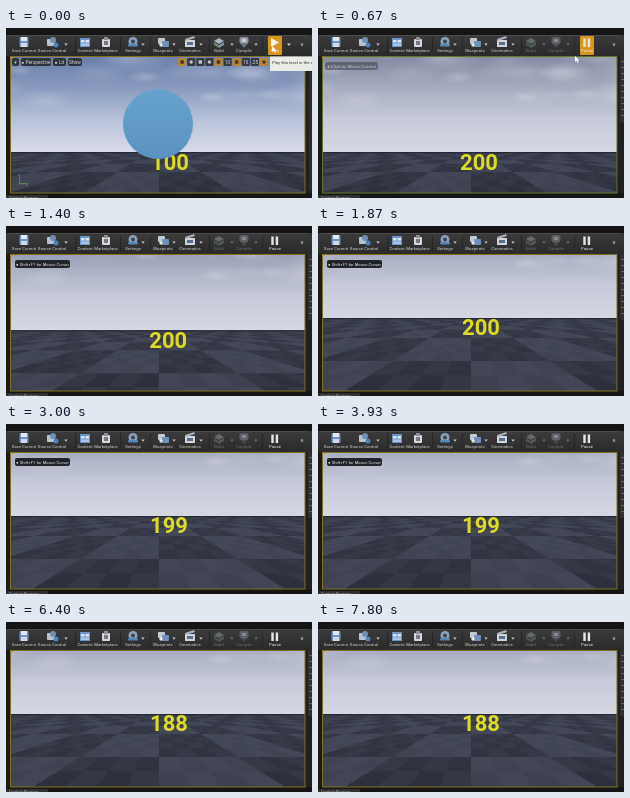
An HTML page with a canvas for the animation above (7.87 s loop, 306 px wide and 170 px high).

```html
<!DOCTYPE html>
<html>
<head>
<meta charset="utf-8">
<style>
html, body { margin: 0; width: 100%; height: 100%; overflow: hidden; background: #191919; }
canvas { display: block; width: 306px; height: 170px; }
</style>
</head>
<body>
<canvas id="stage"></canvas>
<script>
const W = 306, H = 170, LOOP = 7870, PLAY = 340;
const cv = document.getElementById('stage'), c = cv.getContext('2d');
const dpr = window.devicePixelRatio || 1;
cv.width = W * dpr;
cv.height = H * dpr;
c.scale(dpr, dpr);

const clamp = v => Math.max(0, Math.min(1, v));
const smooth = v => { v = clamp(v); return v * v * (3 - 2 * v); };

let seed = 7;
const rnd = () => (seed = seed * 16807 % 2147483647) / 2147483647;
const clouds = Array.from({ length: 34 }, () => ({
  x: rnd() * 370 - 30, y: rnd() * 62 - 112, r: 14 + rnd() * 25, a: .1 + rnd() * .2
}));

function rect(x, y, w, h, color, r = 0) {
  c.fillStyle = color;
  c.beginPath();
  c.roundRect(x, y, w, h, r);
  c.fill();
}
function poly(color, ...p) {
  c.fillStyle = color;
  c.beginPath();
  for (let i = 0; i < p.length; i += 2) c.lineTo(p[i], p[i + 1]);
  c.fill();
}
function disc(x, y, r, color) {
  c.fillStyle = color;
  c.beginPath();
  c.arc(x, y, r, 0, 7);
  c.fill();
}
function text(s, x, y, size, color, align = 'left', weight = 400) {
  c.font = `${weight} ${size}px Roboto, sans-serif`;
  c.textAlign = align;
  c.fillStyle = color;
  c.fillText(s, x, y);
}
function gradient(y0, y1, ...colors) {
  const g = c.createLinearGradient(0, y0, 0, y1);
  colors.forEach((k, i) => g.addColorStop(i / (colors.length - 1), k));
  return g;
}

function sky(h, t, live) {
  const tones = live ? ['#7f879e', '#a5abbf', '#c6cad9', '#d5d7e2'] : ['#677da8', '#8799bd', '#b8c2d9', '#d9dcea'];
  rect(5, 28, 294, h - 28, gradient(h - 98, h, ...tones));
  for (const k of clouds) {
    c.save();
    c.translate(k.x + t * .0012, h + k.y);
    c.scale(1, .38);
    const g = c.createRadialGradient(0, 0, 0, 0, 0, k.r);
    g.addColorStop(0, `rgba(226,226,237,${k.a})`);
    g.addColorStop(1, 'rgba(226,226,237,0)');
    c.fillStyle = g;
    c.fillRect(-k.r, -k.r, 2 * k.r, 2 * k.r);
    c.restore();
  }
}

function floor(h) {
  const vy = h - 6, depth = v => 1 / Math.max(.004, .0204 + .018 * v);
  const tile = (i, j, s, color) => {
    const a = depth(j), b = depth(j + s), k = 1.6;
    poly(color, 153 + i * k * a, vy + a, 153 + (i + s) * k * a, vy + a,
      153 + (i + s) * k * b, vy + b, 153 + i * k * b, vy + b);
  };
  c.save();
  c.beginPath();
  c.rect(5, h, 294, 165 - h);
  c.clip();
  rect(5, h, 294, 165 - h, gradient(h, 165, '#353947', '#2d303c'));
  for (let j = -1; j < 8; j++)
    for (let i = -16; i < 16; i++) {
      if ((i + j) & 1) tile(i, j, 1, 'rgba(88,93,110,.38)');
      if (j < 3 && Math.abs(i + .5) < 7)
        for (let n = 0; n < 16; n++) {
          const u = n & 3, v = n >> 2;
          if ((u + v) & 1) tile(i + u / 4, j + v / 4, .25, 'rgba(110,116,134,.09)');
        }
    }
  rect(5, h, 294, 1.2, 'rgba(25,28,40,.6)');
  c.restore();
}

const tools = [
  [18, 'Save Current'], [46, 'Source Control', 60], [79, 'Content'], [100, 'Marketplace'],
  [127, 'Settings', 137], [157, 'Blueprints', 168], [184, 'Cinematics', 195],
  [213, 'Build', 226], [238, 'Compile', 250]
];
const icons = [
  x => { rect(x - 4.5, 9, 9, 10, '#6f93c8', 1); rect(x - 3, 9, 6, 4, '#e5e9f0'); rect(x - 3, 15, 6, 4, '#d2d9e6'); },
  x => { rect(x - 5, 11, 8, 7, '#b9c4d3', 1); disc(x + 1, 12, 3, '#718fb5'); disc(x + 4, 17, 2.5, '#4f82bd'); },
  x => { rect(x - 5, 10, 10, 9, '#6995c9'); rect(x - 4, 12, 3.5, 2.5, '#dce6f2'); rect(x + .5, 12, 3.5, 2.5, '#dce6f2'); rect(x - 4, 15.5, 8, 2.5, '#aac4e2'); },
  x => { rect(x - 4, 11, 8, 8, '#d6d8db', 1); rect(x - 2, 9, 4, 3, '#8a9097'); rect(x - 2, 13, 4, 4, '#778'); },
  x => { disc(x, 13.5, 4.5, '#8da2bd'); disc(x, 13.5, 2, '#3b4654'); rect(x - 5, 16, 10, 2.5, '#5586b8', 1); },
  x => { rect(x - 5, 10, 7, 6, '#c4cad3', 1); rect(x - 1, 13, 7, 6, '#6d8fb8', 1); disc(x - 2, 17, 1.7, '#e7e7e7'); },
  x => { rect(x - 5, 12, 10, 7, '#d2d5d9'); poly('#aab3bf', x - 5, 11, x + 4, 8, x + 5, 10, x - 4, 13); rect(x - 3, 14, 6, 3, '#56718f'); },
  x => { poly('#a9b3bf', x - 5, 13, x, 10, x + 5, 13, x, 16); poly('#6e8c72', x - 5, 14, x, 17, x, 20, x - 5, 17); poly('#8094a8', x, 17, x + 5, 14, x + 5, 17, x, 20); },
  x => { rect(x - 4.5, 9, 9, 7, '#9099a4', 2); poly('#6c7782', x - 4, 15, x + 4, 15, x, 20); rect(x - 2, 11, 4, 3, '#c8ced4'); }
];

function cursor(x, y) {
  poly('#fff', x, y, x, y + 6, x + 1.5, y + 4.6, x + 2.6, y + 7, x + 3.6, y + 6.5, x + 2.6, y + 4.3, x + 4.3, y + 4.2);
}

function toolbar(live, hot) {
  rect(0, 0, W, 7, '#151515');
  rect(0, 7, W, 21, gradient(7, 28, '#3b3b3b', '#2a2a2a'));
  rect(3, 7, 298, .7, '#505050');
  tools.forEach(([x, label, caret], i) => {
    c.globalAlpha = live && i > 6 ? .4 : 1;
    icons[i](x);
    text(label, x, 24.2, 4.3, '#d2d2d2', 'center');
    if (caret) poly('#c8c8c8', caret - 1.7, 15.5, caret + 1.7, 15.5, caret, 17.7);
    c.globalAlpha = 1;
  });
  for (const x of [69, 114, 144, 203, 256]) rect(x, 9, .7, 16, '#222');
  if (hot) rect(262, 8, 14, 19, '#d9961d', 1);
  if (live) {
    rect(265.3, 10.5, 2.4, 8.5, '#e6e6e6');
    rect(269.7, 10.5, 2.4, 8.5, '#e6e6e6');
  } else poly('#f2f2ee', 265, 10, 273, 14.5, 265, 19);
  text(live ? 'Pause' : 'Play', 269, 24.2, 4.3, '#eee', 'center');
  if (!live) poly('#ccc', 281, 15.5, 285, 15.5, 283, 18);
  text('»', 296, 19, 7, '#ddd', 'center');
}

function editorOverlay() {
  const pill = (x, w, s) => { rect(x, 30, w, 8, 'rgba(38,39,43,.88)', 2); text(s, x + w / 2, 35.8, 4.8, '#ddd', 'center'); };
  pill(6, 7, '▾');
  pill(15, 30, '● Perspective');
  pill(47, 13, '● Lit');
  pill(62, 14, 'Show');
  for (let i = 0; i < 10; i++) {
    const x = 172 + i * 9.1, on = [0, 4, 6, 9].includes(i);
    rect(x, 30, 8.2, 8, on ? '#b88536' : 'rgba(48,49,54,.9)', 1);
    if (i === 5 || i === 7 || i === 8) text(i === 8 ? '.25' : '10', x + 4, 35.7, 4.5, '#ddd', 'center');
    else rect(x + 2.4, 32.3, 3.4, 3.4, on ? '#47351c' : '#c6c6c6', i % 2 * 1.7);
  }
  rect(13, 148, .9, 8, '#4275cf');
  rect(13, 155.3, 7, .9, '#58a65a');
  text('z', 12, 148, 4, '#79a0e0');
  text('y', 20, 157, 4, '#76b777');
  rect(264, 28, 42, 15, '#ebebe8');
  rect(264, 28, 42, .7, '#8b8b8b');
  text('Play this level in the s', 266, 36.3, 4.3, '#333');
  cursor(266, 18);
}

function hint(t) {
  if (t < 1000) {
    rect(7, 34, 53, 8, 'rgba(75,78,89,.65)', 2);
    text('● Click for Mouse Control', 33.5, 39.7, 4.3, '#c5c8d0', 'center');
    return;
  }
  c.globalAlpha = 1 - clamp((t - 4250) / 850);
  rect(9, 34, 55, 8, '#22242b', 2);
  text('● Shift+F1 for Mouse Cursor', 36.5, 39.7, 4.2, '#e3e3e3', 'center');
  c.globalAlpha = 1;
}

function draw(t) {
  const live = t >= PLAY, move = smooth((t - 850) / 950), h = 124 - 32 * move;
  const value = !live ? 100 : t < 2500 ? 200 : t < 4270 ? 199 : t < 5500 ? 189 : 188;
  rect(0, 0, W, H, '#1b1b1b');
  c.save();
  c.beginPath();
  c.rect(5, 28, 294, 137);
  c.clip();
  sky(h, t, live);
  floor(h);
  const x = live ? 161 + 2 * move : 164;
  text(value, x, h + 18 - move, 22, '#dedb22', 'center', 700);
  if (!live) disc(152, 96, 35, gradient(61, 131, '#67a2cf', '#5b93bf'));
  c.restore();

  c.lineWidth = 1;
  c.strokeStyle = live && t < 1000 ? '#657526' : '#80701f';
  c.strokeRect(4.5, 28.5, 294.5, 136.5);
  rect(300, 28, 6, 137, '#202020');
  if (live) {
    rect(302, 28, 4, 66, '#303030');
    for (let y = 33; y < 93; y += 6) rect(303, y, 3, 1, '#666');
  } else rect(303, 44, 3, 119, '#2d2d2d');
  rect(0, 166, W, 4, '#151515');
  rect(0, 167, 42, 3, '#303030');
  text('Content Browser', 3, 170.5, 4, '#aaa');
  rect(4, 29, 3, 1, '#c79830');

  toolbar(live, t < 1000);
  if (live) {
    hint(t);
    if (t < 1000) cursor(257, 28);
  } else editorOverlay();
}

function tick() {
  draw(performance.now() % LOOP);
  requestAnimationFrame(tick);
}
tick();
</script>
</body>
</html>
```
